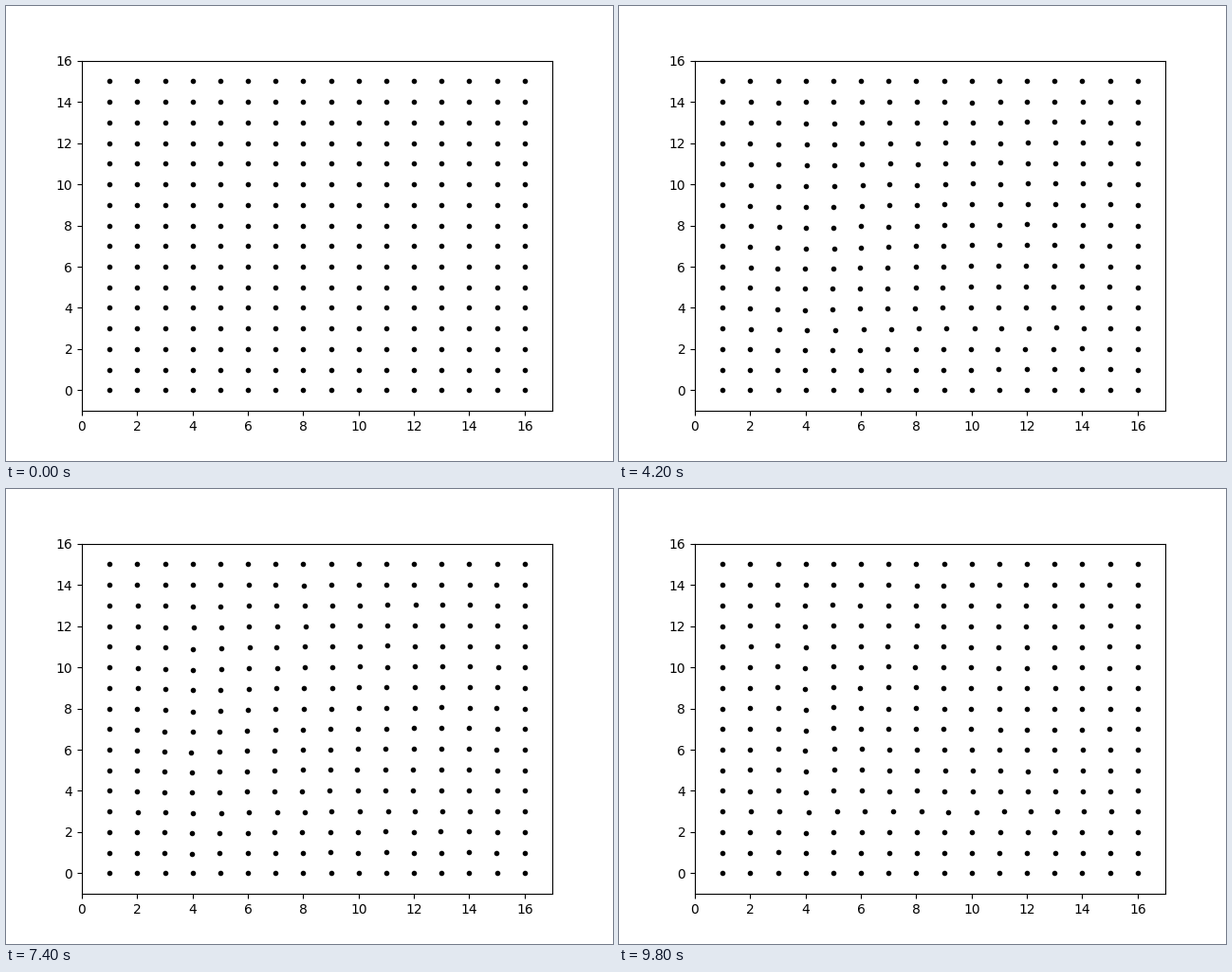
A matplotlib script that plays this animation: 640 by 480 pixels, repeating every 10 s.

```python
import numpy as np
import matplotlib.pyplot as plt
from matplotlib.animation import FuncAnimation

N = 16
FRAMES = 50
STEP_MS = 200
# Periods in frames
SHEAR_PERIOD = 16.8
ROW_PERIOD = 5.6
COL_PERIOD = 3.22

cols, rows = np.meshgrid(np.arange(1, N + 1), np.arange(N))
u = (cols - 1) / (N - 1)
v = rows / (N - 1)
inner = (u > 0) & (u < 1) & (v > 0) & (v < 1)

# Slow shear of the whole grid, stronger around column 4
shear_x = 0.05 * np.sin(np.pi * u) * np.sin(2 * np.pi * v)
bump = 0.085 * np.exp(-((cols - 4) / 1.5) ** 2)
shear_y = np.sin(np.pi * v) * (0.05 * np.sin(2 * np.pi * u) + bump)

# One row and one column ring faster, each along its own length
row_ring = 0.15 * (rows == 3) * np.sin(np.pi * u)
col_ring = 0.14 * (cols == 4) * np.sin(np.pi * v)

# Every dot also trembles slightly at its own rate
rng = np.random.default_rng(4)
rate = rng.uniform(0.5, 2.2, (2, N, N))
size = rng.normal(0, 0.014, (2, N, N))


def swing(t, period):
    return -np.sin(2 * np.pi * t / period)


def positions(t):
    shear = swing(t, SHEAR_PERIOD)
    tremble = size * np.sin(rate * t)
    dx = shear_x * shear + row_ring * swing(t, ROW_PERIOD) + tremble[0]
    dy = shear_y * shear + col_ring * swing(t, COL_PERIOD) + tremble[1]
    return (cols + inner * dx).ravel(), (rows + inner * dy).ravel()


fig, ax = plt.subplots(figsize=(6.4, 4.8), dpi=100)
ax.set_xlim(0, N + 1)
ax.set_ylim(-1, N)
dots, = ax.plot(*positions(0), "k.")


def update(t):
    dots.set_data(*positions(t))
    return dots,


anim = FuncAnimation(fig, update, frames=FRAMES, interval=STEP_MS,
                     repeat=True, repeat_delay=0)
plt.show()
```
